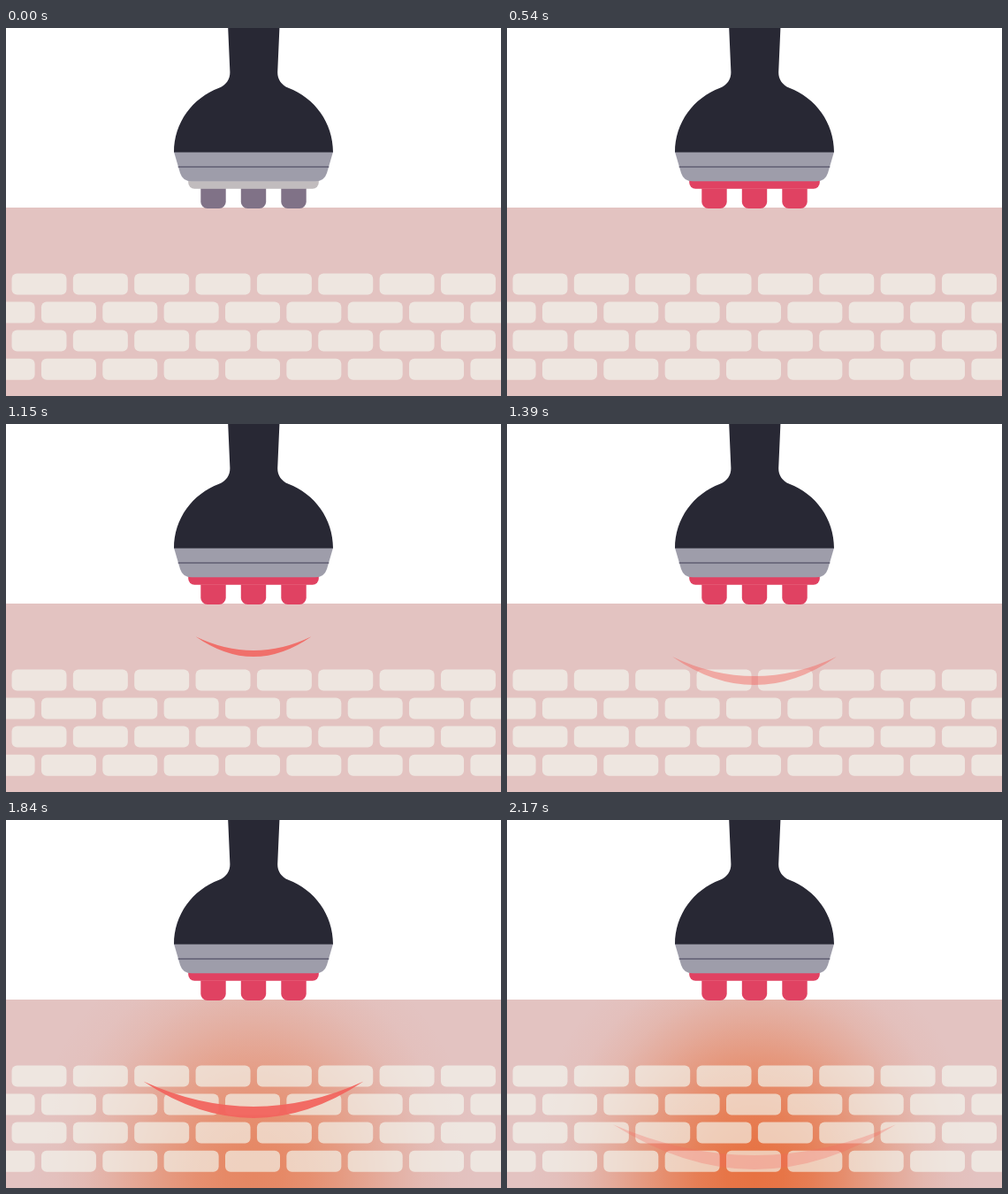
Recreate the animation shown at these times as an HTML page with a canvas. Size 560 by 416 pixels, loop 2.77 s.

```html
<!DOCTYPE html>
<html lang="en">
<head>
<meta charset="utf-8">
<title>Warming massager</title>
<style>
  html, body { margin: 0; width: 100%; height: 100%; overflow: hidden; background: #fff; }
  canvas { display: block; width: 560px; height: 416px; }
</style>
</head>
<body>
<canvas id="stage" width="560" height="416"></canvas>
<script>
const ctx = document.getElementById('stage').getContext('2d');
const W = 560, H = 416, CX = 280, SKIN = 203;
const LOOP = 2770, WAVES = 5, FIRST_WAVE = 712, WAVE_GAP = 302;
const RED = [224, 66, 98];

const clamp = v => Math.max(0, Math.min(1, v));
const ramp = (t, a, b) => clamp((t - a) / (b - a));
const mix = (a, b, p) => `rgb(${a.map((v, i) => Math.round(v + (b[i] - v) * p))})`;

function box(x, y, w, h, radii, fill) {
  ctx.fillStyle = fill;
  ctx.beginPath();
  ctx.roundRect(x, y, w, h, radii);
  ctx.fill();
}

// Elliptic heat spot with a cosine falloff
function drawGlow(alpha) {
  ctx.save();
  ctx.beginPath();
  ctx.rect(0, SKIN, W, H - SKIN);
  ctx.clip();
  ctx.globalAlpha = alpha;
  ctx.translate(CX, 402);
  ctx.scale(1, 1.1);
  const g = ctx.createRadialGradient(0, 0, 0, 0, 0, 255);
  for (let d = 0; d <= 1; d += 0.125) {
    g.addColorStop(d, `rgba(231,114,66,${(1 + Math.cos(Math.PI * d)) / 2})`);
  }
  ctx.fillStyle = g;
  ctx.fillRect(-CX, -H, W, 2 * H);
  ctx.restore();
}

function drawBricks() {
  for (let row = 0; row < 4; row++) {
    const left = row % 2 ? -29.4 : 6.5;
    for (let x = left; x < W; x += 69.35) {
      box(x, 277.4 + row * 32.1, 62, 24, 6, 'rgba(244,251,243,0.64)');
    }
  }
}

// Each crescent is wider, deeper and thicker than the one above
function drawWave(k, t) {
  const age = t - FIRST_WAVE - k * WAVE_GAP;
  const alpha = ramp(age, 0, 150) * (1 - ramp(age, 230, 260));
  if (!alpha) return;
  const half = 42 + k * (21.5 + 2 * k);
  const depth = 13.5 + 9.3 * k;
  const thick = 4 + 3 * k;
  const top = 235 + k * (28 - k + k * k) - depth;
  ctx.fillStyle = `rgba(243,100,94,${alpha * 0.94})`;
  ctx.beginPath();
  ctx.moveTo(CX - half, top);
  ctx.quadraticCurveTo(CX, top + 2 * depth, CX + half, top);
  ctx.quadraticCurveTo(CX, top + 2 * (depth - thick), CX - half, top);
  ctx.fill();
}

function drawHead(heat) {
  const pin = mix([128, 114, 135], RED, heat);
  for (let i = -1; i <= 1; i++) {
    const x = 265.8 + i * 45.5;
    box(x, 181, 28.4, 23, [0, 0, 7.5, 7.5], pin);
    ctx.fillStyle = `rgba(255,225,230,${0.15 + 0.35 * heat})`;
    ctx.fillRect(x, 181, 28.4, 1);
  }
  box(206.2, 172, 147.6, 9.7, [0, 0, 7, 7], mix([193, 188, 190], RED, heat));
}

function drawCollar() {
  ctx.fillStyle = '#9e9daa';
  ctx.beginPath();
  ctx.moveTo(190, 140);
  ctx.lineTo(370, 140);
  ctx.lineTo(363, 164);
  ctx.quadraticCurveTo(360, 173.3, 350, 173.3);
  ctx.lineTo(210, 173.3);
  ctx.quadraticCurveTo(200, 173.3, 197, 164);
  ctx.fill();
  ctx.fillStyle = '#5c5970';
  ctx.fillRect(194.7, 156.3, 170.6, 1.4);
}

function drawHandle() {
  ctx.fillStyle = '#282834';
  ctx.beginPath();
  ctx.moveTo(251.2, 0);
  ctx.lineTo(253.4, 50);
  ctx.bezierCurveTo(253.5, 58, 249, 64.5, 241, 67.8);
  ctx.bezierCurveTo(211, 79, 190, 107, 190, 140.6);
  ctx.lineTo(370, 140.6);
  ctx.bezierCurveTo(370, 107, 349, 79, 319.5, 67.8);
  ctx.bezierCurveTo(311.6, 64.5, 307.1, 58, 307.2, 50);
  ctx.lineTo(309.4, 0);
  ctx.fill();
}

function draw(t) {
  ctx.fillStyle = '#fff';
  ctx.fillRect(0, 0, W, H);
  ctx.fillStyle = '#e3c3c1';
  ctx.fillRect(0, SKIN, W, H - SKIN);
  drawGlow(ramp(t, 1470, 1970));
  drawBricks();
  for (let k = 0; k < WAVES; k++) drawWave(k, t);
  drawHead(Math.pow(clamp(t / 540), 1.45));
  drawCollar();
  drawHandle();
}

const start = performance.now();
function tick() {
  draw((performance.now() - start) % LOOP);
  requestAnimationFrame(tick);
}
tick();
</script>
</body>
</html>
```
